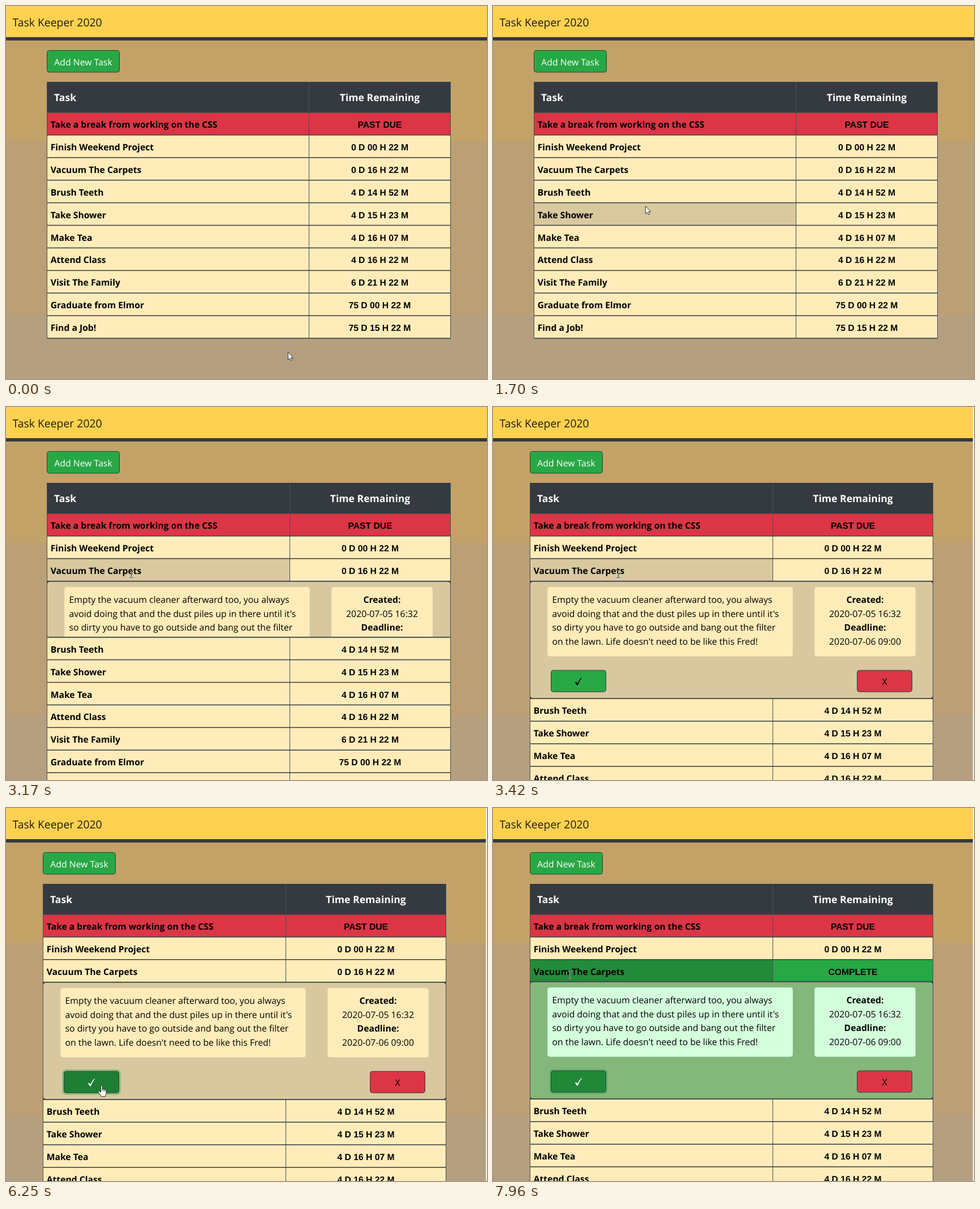
Animation of 850 by 659 pixels, one loop 8 s. Source, as an HTML page:

```html
<!DOCTYPE html>
<html lang="en">
<head>
<meta charset="utf-8">
<title>Task list</title>
<style>
html, body { margin: 0; width: 100%; height: 100%; overflow: hidden; }
svg { display: block; }
text { font: 15.8px "Open Sans", "Noto Sans", sans-serif; text-rendering: geometricPrecision; }
.bold { font-weight: 700; font-size: 15.7px; }
.head { font-weight: 700; font-size: 17.6px; fill: #fff; }
.brand { font-size: 19.4px; fill: #1f1c12; }
.time { font: bold 15.7px "Liberation Sans", Arial, sans-serif; }
.mid { text-anchor: middle; }
.beam { fill: none; stroke: #fff; mix-blend-mode: difference; }
</style>
</head>
<body>
<svg id="stage" width="850" height="659" viewBox="0 0 850 659"></svg>
<script>
const LOOP = 8000, STEP = 120;
const DARK = '#343a40', GREEN = '#28a745', RED = '#dc3545', CREAM = '#ffecb9';
const OPEN_ROW = 2, ROW_H = 39.9, ROWS_Y = 188;

const tasks = [
  ['Take a break from working on the CSS', 'PAST DUE'],
  ['Finish Weekend Project', '0 D 00 H 22 M'],
  ['Vacuum The Carpets', '0 D 16 H 22 M'],
  ['Brush Teeth', '4 D 14 H 52 M'],
  ['Take Shower', '4 D 15 H 23 M'],
  ['Make Tea', '4 D 16 H 07 M'],
  ['Attend Class', '4 D 16 H 22 M'],
  ['Visit The Family', '6 D 21 H 22 M'],
  ['Graduate from Elmor', '75 D 00 H 22 M'],
  ['Find a Job!', '75 D 15 H 22 M']
];
const notes = [
  'Empty the vacuum cleaner afterward too, you always',
  "avoid doing that and the dust piles up in there until it's",
  'so dirty you have to go outside and bang out the filter',
  "on the lawn. Life doesn't need to be like this Fred!"
];
const dates = ['Created:', '2020-07-05 16:32', 'Deadline:', '2020-07-06 09:00'];

// Pointer runs: start time, then one position per step.
const runs = [
  [0, [[498, 611]]],
  [500, [[491, 602], [474, 580], [450, 552], [422, 521], [394, 490], [368, 460], [346, 439],
         [330, 425], [312, 402], [291, 377], [269, 353], [249, 332], [231, 314], [220, 303]]],
  [2190, [[221, 295, 'beam']]],
  [4660, [[267, 374, 'beam'], [291, 447], [302, 478]]],
  [5520, [[283, 486], [236, 491], [186, 491, 'hand'], [168, 490, 'hand']]],
  [7120, [[166, 479, 'hand'], [160, 452], [153, 413, 'beam'], [147, 372, 'beam'],
          [142, 338, 'beam'], [137, 309], [132, 299, 'beam'], [135, 295, 'beam']]]
];
const pointer = runs.flatMap(([start, pts]) =>
  pts.map(([x, y, shape = 'arrow'], i) => ({ at: start + i * STEP, x, y, shape })));

const growth = [[2930, 0], [3050, 19], [3170, 99], [3290, 187], [3420, 207.5]];
const PRESS = 6130, DONE = 6370, SCROLLBAR = 3290;

const cursors = {
  arrow: '<path d="M.5.5V14L3.6 11.2 5.5 15.8 7.6 14.9 5.7 10.4H9.6Z" fill="#fff" stroke="#222" stroke-width=".9"/>',
  hand: '<path transform="translate(-5.5 0)" d="M5 1.4C5 0 7.6 0 7.6 1.4V6.6C8.2 5.9 10 6 10.2 7.2 10.9 6.6 12.3 7 12.5 8.1 13.4 7.5 14.6 8.1 14.6 9.3V13.4C14.6 15.7 13 16.6 13 19.6H5.6C5.6 17 1.5 13.5.6 11.5.2 10.2 1.8 9.4 2.9 10.4L5 12.5ZM7.6 6.6V10.5M10.2 7.2V10.7M12.5 8.1V11" fill="#fff" stroke="#222" stroke-width=".9"/>',
  beam: '<path class="beam" d="M-2.5-6.5H-.5M1.5-6.5H3.5M.5-6V6M-2.5 6.5H-.5M1.5 6.5H3.5"/>'
};

const rect = (x, y, w, h, fill, extra = '') =>
  `<rect x="${x}" y="${y}" width="${w}" height="${h}" fill="${fill}" ${extra}/>`;
const text = (x, y, str, cls = '', fill = '#000') =>
  `<text x="${x}" y="${y}" class="${cls}" fill="${fill}">${str}</text>`;
const button = (x, y, w, h, fill) =>
  rect(x + .5, y + .5, w - 1, h - 1, fill, `rx="4" stroke="${DARK}"`);

function stateAt(t) {
  const p = pointer.findLast(k => k.at <= t);
  const grown = growth.findLast(k => k[0] <= t);
  const scroll = t >= SCROLLBAR, done = t >= DONE;
  const left = scroll ? 65 : 72;
  return {
    p, scroll, done, left,
    right: scroll ? 778 : 786,
    split: left + (grown ? 429 : 463),
    height: grown ? grown[1] : 0,
    pressed: t >= PRESS
  };
}

function backdrop(s) {
  return rect(0, 0, 850, 239, '#c3a268') +
    rect(0, 239, 850, 307, '#bb9f76') +
    rect(0, 546, 850, 113, '#b59f81') +
    rect(0, 0, 850, 55, '#ffd150') +
    rect(0, 55, 850, 6, DARK) +
    text(11.5, 36, 'Task Keeper 2020', 'brand') +
    button(s.left, 78, 129, 39.5, GREEN) +
    text(s.left + 64.5, 104.5, 'Add New Task', 'mid', '#fff');
}

function details(s, y) {
  const dy = s.done ? -1 : 0, w = s.right - s.left;
  const box = s.done ? '#d4ffdc' : CREAM;
  const edge = s.done ? '#c3eccb' : '#f6e3b1';
  const overCheck = s.p.shape === 'hand';
  const lit = overCheck || s.pressed;
  const checkFill = s.pressed && !s.done ? '#1e7e34' : lit ? '#218838' : GREEN;
  const panel = (x, pw) => rect(x + .5, 10.5, pw - 1, 122, box, `rx="4" stroke="${edge}"`);
  let out = rect(0, 0, w, 207.5, DARK) +
    rect(.8, .8, w - 1.6, 206, s.done ? '#84b77b' : '#d8c8a0', 'rx="5"') +
    panel(31, 434) + panel(503, 179);
  notes.forEach((line, i) => out += text(39.5, 38.3 + i * 24.75, line));
  dates.forEach((line, i) =>
    out += text(592.5, 38.3 + i * 24.75, line, i % 2 ? 'mid' : 'mid bold'));
  if (s.pressed) {
    out += rect(34, 154, 104, 45, 'rgba(72,180,97,.5)', 'rx="7"');
  }
  out += button(37, 157, 98, 39, checkFill) +
    `<path transform="translate(86 177.5)" d="M-6 1.2L-4 .2-1.8 3.2C0-1 2.5-5 5.8-7.2L6.2-6.5C3-3 .5 2-1.2 6.2H-2.8Z" fill="${lit ? '#fff' : '#000'}"/>` +
    button(578, 157, 98, 39, RED) +
    text(627, 183, 'X', 'mid');
  return `<svg x="${s.left}" y="${y + dy}" width="${w}" height="${s.height}">${out}</svg>`;
}

function table(s) {
  const { left, right, split, p } = s;
  const center = (split + right) / 2;
  const rowY = i => ROWS_Y + i * ROW_H + (i > OPEN_ROW ? s.height - (s.done ? 1 : 0) : 0);
  const line = y => rect(left, y - .8, right - left, 1.6, '#3f4549');
  let out = rect(left, 134, right - left, 54, DARK) +
    rect(split, 134, 1, 54, '#4a5259') +
    text(left + 13, 168, 'Task', 'head') +
    text(center, 168, 'Time Remaining', 'head mid');
  tasks.forEach(([name, left4], i) => {
    const y = rowY(i), complete = s.done && i === OPEN_ROW;
    const fill = complete ? GREEN : i ? CREAM : RED;
    const hotY = p.y + 4;
    const hover = p.x > left && p.x < split && hotY >= y && hotY < y + ROW_H;
    out += rect(left, y, right - left, ROW_H, fill);
    if (hover) out += rect(left, y, split - left, ROW_H, complete ? '#228b3a' : '#d8c99f');
    const base = Math.round(y + 27);
    out += rect(split, y, 1, ROW_H, '#4a4f52') + line(y) +
      text(left + 6.7, base, name, 'bold') +
      text(center, base, complete ? 'COMPLETE' : left4, 'time mid');
  });
  out += line(rowY(tasks.length));
  if (s.height) {
    const y = ROWS_Y + (OPEN_ROW + 1) * ROW_H;
    out += details(s, y) + line(y - (s.done ? 1 : 0)) + line(rowY(OPEN_ROW + 1));
  }
  const bottom = rowY(tasks.length);
  return out + rect(left, 134, 1, bottom - 134, '#4a4f52') +
    rect(right - 1, 134, 1, bottom - 134, '#4a4f52');
}

const stage = document.getElementById('stage');
const ticks = [...new Set([...pointer.map(k => k.at), ...growth.map(k => k[0]), PRESS, DONE])]
  .sort((a, b) => a - b);
let shown = -1;

function frame() {
  const t = performance.now() % LOOP;
  const tick = ticks.findLast(k => k <= t);
  if (tick !== shown) {
    shown = tick;
    const s = stateAt(tick);
    stage.innerHTML = backdrop(s) + table(s) +
      (s.scroll ? rect(848, 0, 2, 659, '#f6f6f6') : '') +
      `<g transform="translate(${s.p.x} ${s.p.y})" style="mix-blend-mode:${s.p.shape === 'beam' ? 'difference' : 'normal'}">${cursors[s.p.shape]}</g>`;
  }
  requestAnimationFrame(frame);
}
frame();
</script>
</body>
</html>
```
